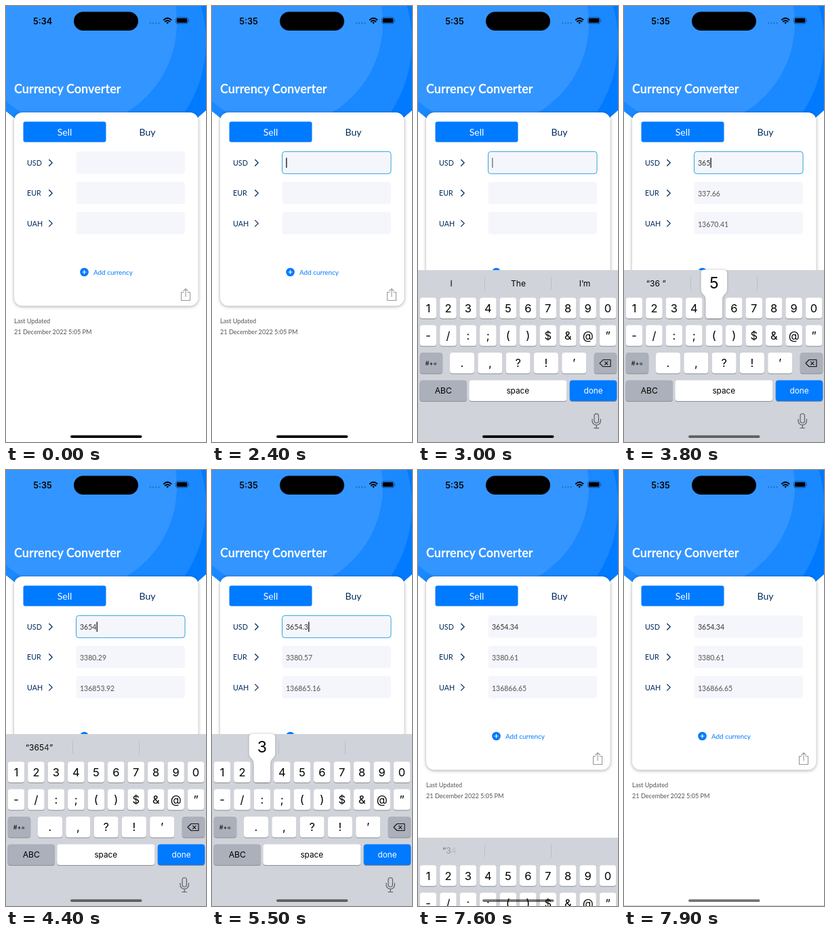
An HTML page for the animation above (8000 ms loop, 295 by 639 pixels).

```html
<!DOCTYPE html>
<html lang="en">
<head>
<meta charset="utf-8">
<title>Currency converter</title>
<style>
  html, body { margin: 0; width: 100%; height: 100%; overflow: hidden; background: #fff; }
  svg { display: block; width: 295px; height: 639px; font-family: Lato, sans-serif; }
  text { white-space: pre; }
  .mid { text-anchor: middle; }
  .ios { font-family: Inter, sans-serif; }
  .line { fill: none; stroke-linecap: round; stroke-linejoin: round; }
  #card { filter: drop-shadow(0 1px 2.5px rgba(0, 0, 0, .35)); }
</style>
</head>
<body>
<svg viewBox="0 0 295 639">
  <clipPath id="headClip"><path d="M0 0H295V153L280 166H15L0 154Z"/></clipPath>
  <g clip-path="url(#headClip)">
    <rect width="295" height="170" fill="#007aff"/>
    <circle cx="108" cy="52" r="187" fill="#1a88ff"/>
    <circle cx="100" cy="25" r="152" fill="#3395ff"/>
  </g>

  <g id="status">
    <text id="clock" class="mid ios" x="54" y="26.5" font-size="12.6" font-weight="600"></text>
    <rect x="100" y="8.500" width="95" height="27.500" rx="13.750"/>
    <path d="M213 25H227" stroke="#0a3f80" stroke-opacity=".55" stroke-width="2" stroke-linecap="round" stroke-dasharray="0 4.200"/>
    <g class="line" stroke="#000" stroke-width="1.900" stroke-linecap="butt">
      <path d="M232.800 20.200Q238.200 15.400 243.600 20.200M234.800 22.700Q238.200 19.700 241.600 22.700"/>
    </g>
    <path d="M236.300 24.300Q238.200 22.800 240.100 24.300L238.200 26.300Z"/>
    <rect x="250.500" y="16.800" width="18" height="9" rx="2.700" fill="none" stroke="#000" stroke-opacity=".45"/>
    <rect x="251.800" y="18.100" width="15.400" height="6.400" rx="1.600"/>
    <path d="M269.800 19.800Q271.400 21.300 269.800 22.800Z" opacity=".5"/>
  </g>
  <text x="12" y="128" font-size="18" font-weight="700" fill="#fff">Currency Converter</text>

  <rect id="card" x="12" y="156" width="271.500" height="283.500" rx="12" fill="#fff"/>
  <rect x="25.500" y="169.500" width="122" height="30" rx="3" fill="#007aff"/>
  <text class="mid" x="86.500" y="189.700" font-size="14" fill="#fff">Sell</text>
  <text class="mid" x="208.500" y="189.700" font-size="14" fill="#002a5c">Buy</text>
  <g id="rows"></g>
  <rect id="caret" y="222.500" width="1.300" height="14.500" fill="#111"/>

  <circle cx="115.500" cy="390" r="6.300" fill="#007aff"/>
  <path d="M112.500 390H118.500M115.500 387V393" stroke="#fff" stroke-width="1.200"/>
  <text x="129" y="393.500" font-size="9.900" fill="#007aff">Add currency</text>
  <path class="line" stroke="#999" stroke-width="1.100" d="M262 419.500H258.500V431.500H271.500V419.500H268M265 426V414.500M261.800 417.500L265 414.300L268.200 417.500"/>
  <g font-size="9.150" fill="#555">
    <text x="12" y="465.300">Last Updated</text>
    <text x="12" y="481">21 December 2022 5:05 PM</text>
  </g>

  <g id="keyboard" class="ios">
    <rect y="387" width="295" height="260" fill="#d0d3d9"/>
    <path d="M98.500 397V416M196.500 397V416" stroke="#bcc0c6"/>
    <g id="hints" class="mid" font-size="12"></g>
    <g id="keys" class="mid"></g>
    <g class="line" stroke="#111" stroke-width="1.100">
      <path d="M268 523.500L273 518.500H284V528.500H273ZM275.500 521.300L280 525.800M280 521.300L275.500 525.800"/>
    </g>
    <g class="line" stroke="#5b5f66" stroke-width="1.200">
      <rect x="260" y="597.500" width="6.400" height="13.500" rx="3.200"/>
      <path d="M257 605.500V608A6.200 6.200 0 0 0 269.400 608V605.500M263.200 614.500V618.500M259.800 618.500H266.600"/>
    </g>
    <g id="pop" class="mid">
      <path fill="#fff" style="filter:drop-shadow(0 0 1.500px rgba(0,0,0,.3))"/>
      <text font-size="23"></text>
    </g>
  </g>
  <rect id="home" x="95" y="629.200" width="105.500" height="3.800" rx="1.900"/>
</svg>

<script>
const LOOP = 8000, FOCUS = 2320, SHOW = 2400, HIDE = 7490;
const $ = id => document.getElementById(id);
const clamp = v => Math.max(0, Math.min(1, v));

// Currency rows
const rates = { USD: 1, EUR: 0.9250935, UAH: 37.45318 };
$('rows').innerHTML = Object.keys(rates).map((code, i) => {
  const y = 213 + i * 44.4;
  return `<text x="31" y="${y + 20.700}" font-size="10.700" fill="#002a5c">${code}</text>
    <path class="line" stroke="#002a5c" stroke-width="1.200" d="M63.600 ${y + 12.300}l4.600 4.500l-4.600 4.500"/>
    <rect id="box${code}" x="103.500" y="${y + .300}" width="160.500" height="32.500" rx="4" fill="#f5f6fb"/>
    <text id="val${code}" x="109" y="${y + (i ? 22 : 20.700)}" font-size="10.500" fill="${i ? '#555' : '#333'}"></text>`;
}).join('');

// Keyboard keys
const spots = {};
function key(label, cx, y, w, size = 16.5, fill = '#fff', ink = '#000') {
  spots[label] = { cx, y, w };
  const rect = (dy, color) =>
    `<rect x="${cx - w / 2}" y="${y + dy}" width="${w}" height="30.500" rx="4" fill="${color}"/>`;
  return rect(1, '#8b8e94') + rect(0, fill) +
    `<text x="${cx}" y="${y + 15.300 + size * .36}" font-size="${size}" fill="${ink}">${label}</text>`;
}
const row = (chars, x, step, y, w) => [...chars].map((c, i) => key(c, x + i * step, y, w)).join('');
const GRAY = '#abb0ba';
$('keys').innerHTML =
  row('1234567890', 15, 29.450, 427.500, 24.500) +
  row('-/:;()$', 15, 29.450, 467.800, 24.500) +
  key('&amp;', 221.200, 467.800, 24.500) +
  row('@”', 250.600, 29.450, 467.800, 24.500) +
  key('#+=', 19.500, 508, 33.500, 9, GRAY) +
  row('.,?!’', 65, 41.300, 508, 36) +
  key('', 276.500, 508, 33.500, 9, GRAY) +
  key('ABC', 37.300, 548.500, 69.500, 12.200, GRAY) +
  key('space', 147.300, 548.500, 144, 11.800) +
  key('done', 258.500, 548.500, 69.500, 11.800, '#007aff', '#fff');

// Typing times, and the suggestions that follow each key
const taps = [
  [3260, '3'], [3550, '6'], [3800, '5'], [4160, '4'],
  [4960, '.'], [5450, '3'], [6030, '4']
];
const hints = [
  [0, 'I', 'The', 'I’m'],
  [3260, '“3”', '', ''], [3550, '“36”', '', ''], [3800, '“365”', '', ''], [4160, '“3654”', '', ''],
  [4960, '', '', ''], [5450, 'people', 'years', 'months'], [6030, '“34”', '', ''],
  [7480, '', '', '']
];

function letters(word, x, alpha) {
  const spans = [...word].map((c, i) =>
    `<tspan fill-opacity="${alpha(i, word.length - 1 - i).toFixed(2)}">${c}</tspan>`).join('');
  return `<text x="${x}" y="410.500">${spans}</text>`;
}

// Letters swap from right to left; a shared beginning stays put
function drawHints(t) {
  const n = hints.findLastIndex(h => t >= h[0]);
  const now = hints[n], was = hints[Math.max(0, n - 1)];
  const dt = n ? t - now[0] : LOOP;
  $('hints').innerHTML = [49, 148, 246].map((x, s) => {
    const a = was[s + 1], b = now[s + 1];
    let same = 0;
    while (same < a.length && a[same] === b[same]) same++;
    const dim = b ? 1 : clamp(1 - dt / 250);
    return letters(a, x, (i, r) => i < same ? 0 : dim * (1 - clamp((dt - 40 * r) / 100))) +
      letters(b, x, (i, r) => i < same ? 1 : clamp((dt - 120 - 40 * r) / 100));
  }).join('');
}

function drawPop(t) {
  const tap = taps.find(([at]) => t >= at - 50 && t < at + 70);
  $('pop').style.display = tap ? '' : 'none';
  if (!tap) return;
  const { cx, y, w } = spots[tap[1]], h = w / 2, b = h + 7;
  const [path, label] = $('pop').children;
  path.setAttribute('d', `M${cx - b + 5} ${y - 41}H${cx + b - 5}q5 0 5 5V${y - 12}
    C${cx + b} ${y - 5} ${cx + h} ${y - 5} ${cx + h} ${y + 3}V${y + 26.500}q0 4 -4 4
    H${cx - h + 4}q-4 0 -4 -4V${y + 3}C${cx - h} ${y - 5} ${cx - b} ${y - 5} ${cx - b} ${y - 12}
    V${y - 36}q0 -5 5 -5Z`);
  label.setAttribute('x', cx);
  label.setAttribute('y', y - 14);
  label.textContent = tap[1];
}

// Critically damped spring from 0 to 1
function spring(ms) {
  const x = Math.max(0, ms) * .0183;
  return 1 - (1 + x) * Math.exp(-x);
}

function draw(t) {
  const done = taps.filter(([at]) => t >= at);
  const typed = done.map(tap => tap[1]).join('');
  const focused = t >= FOCUS && t < HIDE;

  $('clock').textContent = t < 650 ? '5:34' : '5:35';
  for (const code in rates)
    $('val' + code).textContent = code === 'USD' || !typed ? typed : (typed * rates[code]).toFixed(2);
  $('boxUSD').setAttribute('stroke', focused ? '#2ba6d8' : 'none');

  const idle = t - (done.length ? done.at(-1)[0] : FOCUS);
  const blink = Math.max(1 - clamp((idle - 620) / 150), clamp((idle - 1040) / 150));
  $('caret').setAttribute('x', 109.2 + (typed ? $('valUSD').getComputedTextLength() : 0));
  $('caret').setAttribute('opacity', focused ? blink : 0);

  const up = spring(t - SHOW) - spring(t - HIDE);
  $('keyboard').style.display = t < SHOW ? 'none' : '';
  $('keyboard').setAttribute('transform', `translate(0 ${252 * (1 - up)})`);
  $('home').setAttribute('opacity', 1 - .45 * clamp((t - 3350) / 300));
  drawHints(t);
  drawPop(t);
}

const start = performance.now();
function frame() {
  draw((performance.now() - start) % LOOP);
  requestAnimationFrame(frame);
}
frame();
</script>
</body>
</html>
```
